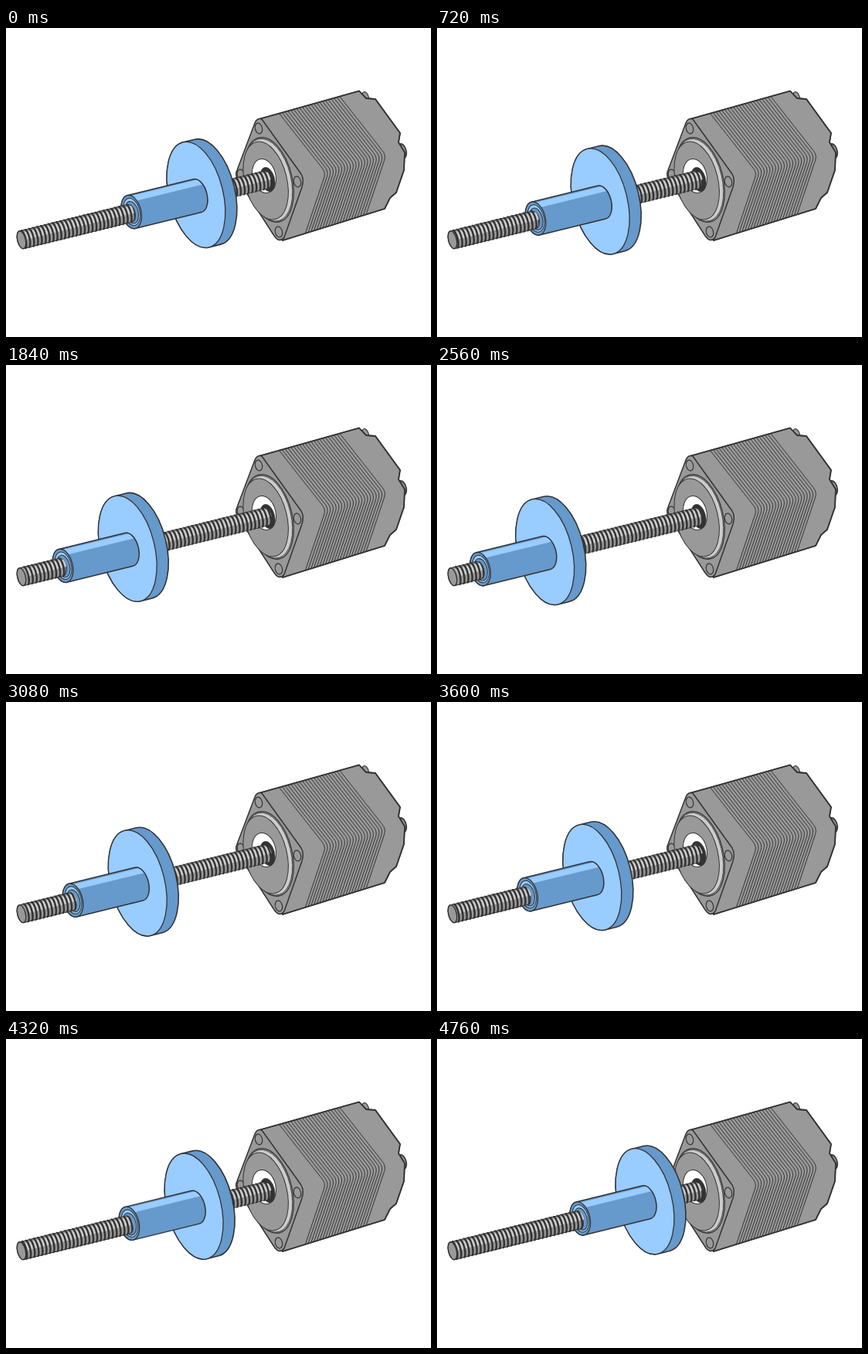
An HTML page with a canvas for the animation above (4800 ms loop, 550 by 400 pixels).

```html
<!DOCTYPE html>
<html lang="en">
<head>
<meta charset="utf-8">
<title>Linear actuator</title>
<style>
  html, body { margin: 0; width: 100%; height: 100%; overflow: hidden; background: #fff; }
  canvas { display: block; }
</style>
</head>
<body>
<canvas id="stage" width="550" height="400"></canvas>
<script>
const ctx = document.getElementById('stage').getContext('2d');
const INK = '#333', GREY = '#999', LIGHT = '#ccc', BLUE = '#69c', SKY = '#9cf';
const TILT = -13.8 * Math.PI / 180, HALF = Math.PI / 2;
const STEP = 40, STEPS = 120, TURN = 60;
const SCREW_END = 325.5, SCREW_R = 11.6, PITCH = 5.2;
const PLATES = 21;

function paint(path, fill, width = 1.4, stroke = INK) {
  if (fill) { ctx.fillStyle = fill; ctx.fill(path); }
  if (width) { ctx.strokeStyle = stroke; ctx.lineWidth = width; ctx.stroke(path); }
}

// A disc seen along the tilted axis: r is its radius, squash its foreshortening.
function disc(x, y, r, squash = 0.57) {
  const path = new Path2D();
  path.ellipse(x, y, r * squash, r, 0, 0, 2 * Math.PI);
  return path;
}

function cylinder(x0, x1, r, squash = 0.57) {
  const path = new Path2D();
  path.ellipse(x0, 0, r * squash, r, 0, HALF, 3 * HALF);
  path.ellipse(x1, 0, r * squash, r, 0, -HALF, HALF);
  path.closePath();
  return path;
}

// A strip of the cylinder's visible side between two angles.
function strip(x0, x1, r, from, to) {
  const path = new Path2D();
  path.ellipse(x1, 0, r * 0.57, r, 0, from, to);
  path.ellipse(x0, 0, r * 0.57, r, 0, to, from, true);
  path.closePath();
  return path;
}

function onAxis(x, y, draw) {
  ctx.save();
  ctx.translate(x, y);
  ctx.rotate(TILT);
  draw();
  ctx.restore();
}

function drawMotor() {
  // rear stub and screw head
  onAxis(510.5, 160, () => {
    paint(cylinder(-4, 2, 10), GREY, 1.2);
    paint(disc(2, 0, 9), GREY, 1);
  });
  onAxis(465, 90, () => paint(disc(0, 0, 7.5), GREY, 1.2));

  const body = new Path2D('M327 118L457 81.5L466 91L478 92L510 136L508 148L516 161L515 184' +
    'L505 213L497 220L490 234L358 275Z');
  paint(body, GREY);

  // laminated stack
  const edge = new Path2D('M352.7 109.5L409 181Q414 187 411.5 194L386.3 269');
  ctx.save();
  ctx.clip(body);
  for (let i = 0; i <= PLATES; i++) {
    paint(edge, null, 1);
    ctx.translate(78 / PLATES, -22.4 / PLATES);
  }
  ctx.restore();
  paint(body, null, 1.8);

  paint(new Path2D('M331 118Q325 116 322 123L299 184Q296 190 300 196L347 269' +
    'Q354 279 360 271L383 206Q386 196 382 189Z'), GREY, 1.5);
  for (const [x, y] of [[327, 130], [304, 190], [353, 264], [377, 199]])
    onAxis(x, y, () => paint(disc(0, 0, 7, 0.65), GREY, 1.2));

  onAxis(340.5, 196.5, () => {
    paint(disc(0, 0, 56, 0.53), GREY, 1.2);
    paint(disc(-0.7, 0, 54.5, 0.53), LIGHT, 0.8);
    paint(disc(-4.5, 0, 51.5, 0.53), GREY, 1);
  });
  onAxis(334, 191.5, () => paint(disc(0, 0, 22.3, 0.67), '#fff', 1));
  onAxis(338.5, 196, () => paint(disc(0, 0, 16), INK, 0.5));
}

function drawScrew(end, shift) {
  ctx.save();
  const visible = new Path2D();
  visible.rect(-20, -20, end + 20, 40);
  visible.ellipse(end, 0, 7, 12.6, 0, 0, 2 * Math.PI);
  ctx.clip(visible);
  paint(cylinder(0, end, SCREW_R, 0.45), GREY, 1);
  paint(strip(0, end, SCREW_R, -0.9, 0.1), LIGHT, 0);
  for (let x = shift + 1; x < end + PITCH; x += PITCH) {
    const thread = new Path2D();
    thread.ellipse(x, 0, SCREW_R * 0.3, SCREW_R, 0, -HALF, HALF);
    paint(thread, null, 2.5);
  }
  paint(disc(-1, 0, SCREW_R, 0.45), GREY, 1.4);
  ctx.restore();
}

function drawFlange() {
  paint(cylinder(0, 15.5, 70, 0.5), BLUE, 1.6);
  paint(disc(0, 0, 70, 0.5), SKY, 1.3);
}

function drawTube() {
  paint(cylinder(0, 88, 22), BLUE, 0);
  paint(strip(0, 88, 22, -1.15, -0.6), SKY, 0);
  paint(cylinder(0, 88, 22), null, 1.5);
  paint(disc(0, 0, 22), BLUE, 1.3);
  paint(disc(0.5, 0, 18), SKY, 1);
  paint(disc(0.5, 0.8, 14.5), BLUE, 1.1);
}

function drawNut(x) {
  ctx.save();
  ctx.translate(x + 86.6, -2.8);
  drawFlange();
  ctx.translate(-86.6, 1.6);
  drawTube();
  ctx.restore();
}

function draw(now) {
  const step = Math.floor(now / STEP) % STEPS;
  const out = step < TURN;
  const nutX = out ? 145.7 - 119 * step / TURN : 26.7 + 145.2 * (step - TURN) / TURN;
  const shift = 4.7 * (out ? step : STEPS - step) / TURN;

  ctx.fillStyle = '#fff';
  ctx.fillRect(0, 0, 550, 400);
  ctx.lineJoin = 'round';
  drawMotor();
  onAxis(21, 274, () => {
    drawScrew(SCREW_END, shift);
    drawNut(nutX);
    drawScrew(nutX - 2, shift);
  });
}

const start = performance.now();
function tick() {
  draw(performance.now() - start);
  requestAnimationFrame(tick);
}
tick();
</script>
</body>
</html>
```
